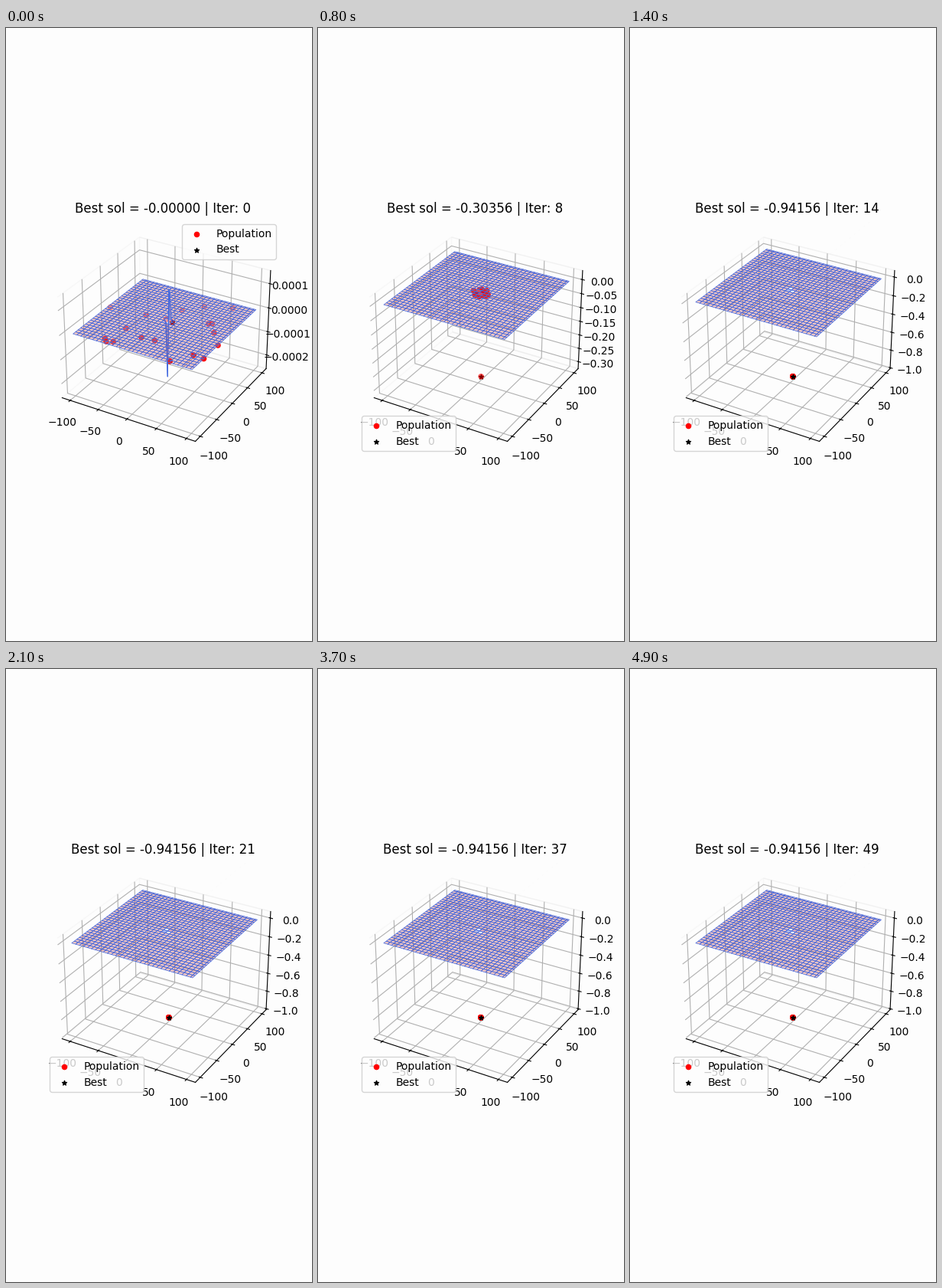
Write a matplotlib script that moves like this. It is 400 by 800 pixels and loops after 5000 ms.

```python
import numpy as np
import matplotlib.pyplot as plt
from matplotlib.animation import FuncAnimation

FRAMES, INTERVAL = 50, 100
MEMBERS, LIMIT = 20, 100
GATHERED, CONVERGED = 3, 13
# Iteration of each new best solution: its distance from the optimum
BEST_GAPS = {0: 5.2, 2: 1.17297, 6: 0.8688, 10: 0.200137}
PAPER = "#fdfdfd"
plt.rcParams.update({"font.family": "DejaVu Sans", "axes.facecolor": PAPER})


def easom(x, y):
    return -np.cos(x) * np.cos(y) * np.exp(-(x - np.pi) ** 2 - (y - np.pi) ** 2)


def leader_at(i):
    gap = [g for start, g in BEST_GAPS.items() if start <= i][-1]
    return np.pi + gap, np.pi


def swarm_at(i):
    """Members crowd towards the middle, then the whole swarm contracts."""
    start = np.random.default_rng(7).uniform(-1, 1, (2, MEMBERS))
    crowding = min(i / GATHERED, 1)
    reach = np.clip((CONVERGED - i) / (CONVERGED - GATHERED), 0, 1) ** 3
    points = np.pi * reach ** 0 + LIMIT * reach * start * np.abs(start) ** crowding
    points = np.clip(points, -LIMIT, LIMIT)
    points[:, 0] = leader_at(i)
    return points


axis_values = np.linspace(-LIMIT, LIMIT, 60)
X, Y = np.meshgrid(axis_values, axis_values)
Z = easom(X, Y)

fig = plt.figure(figsize=(4, 8), dpi=100, facecolor=PAPER)
ax = fig.add_subplot(projection="3d")


def draw(i):
    ax.clear()
    for axis in (ax.xaxis, ax.yaxis, ax.zaxis):
        axis.pane.fill = False
    ax.plot_surface(X, Y, Z, cmap="coolwarm", edgecolor="royalblue", lw=0.5, alpha=0.3)

    bx, by = leader_at(i)
    best = easom(bx, by)
    x, y = swarm_at(i)
    ax.scatter(x, y, np.maximum(easom(x, y), best), c="red", label="Population")
    ax.scatter([bx], [by], [best], c="black", marker="*", label="Best")
    ax.set_title(f"Best sol = {best:.5f} | Iter: {i}")
    ax.legend(loc="upper right" if i < 2 else "lower left")
    return []


anim = FuncAnimation(fig, draw, frames=FRAMES, interval=INTERVAL,
                     init_func=lambda: [], repeat=True, repeat_delay=0)
plt.show()
```
